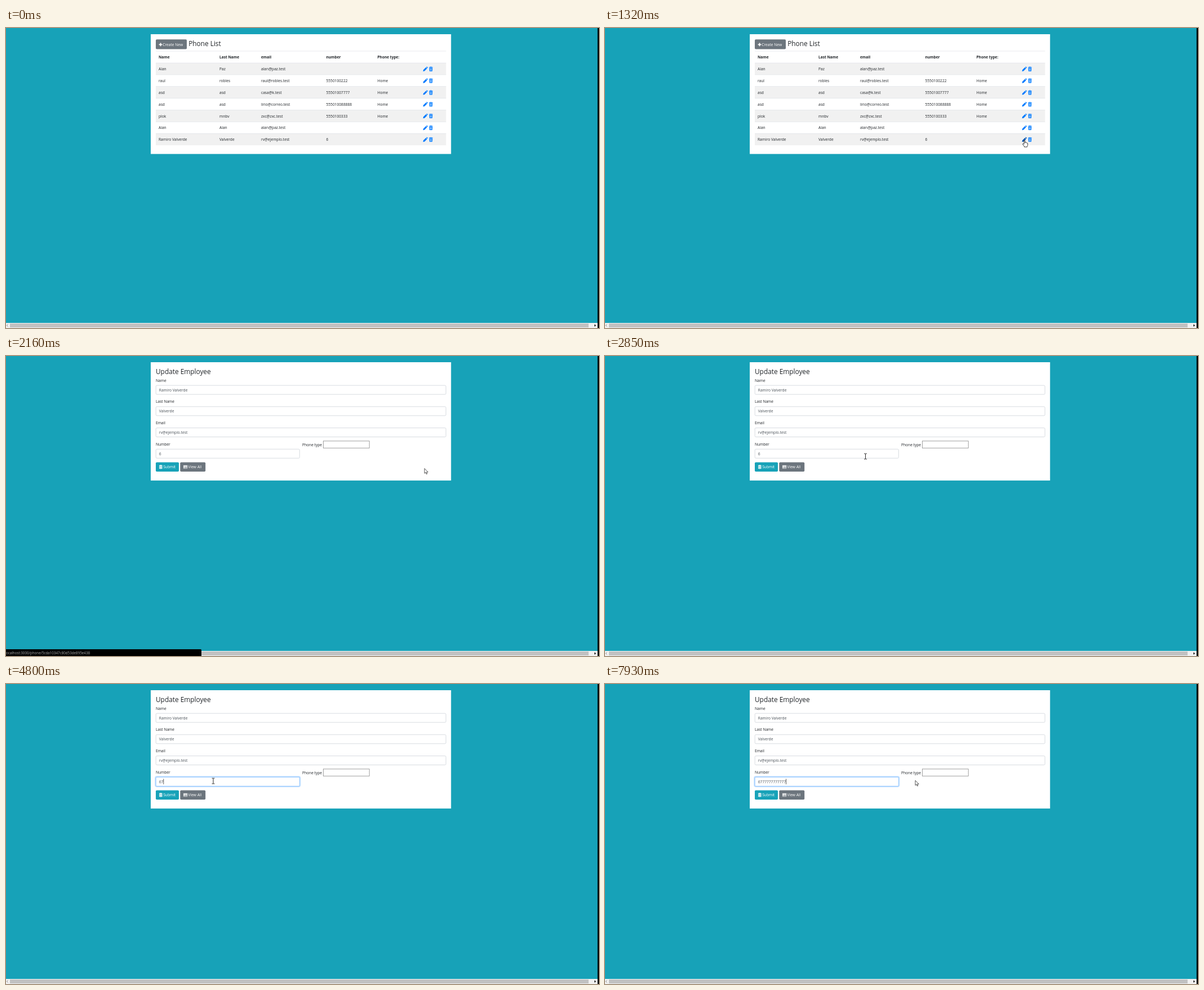
An HTML page that plays this animation: 1053 px wide and 532 px high, repeating every 8000 ms.

```html
<!DOCTYPE html>
<html lang="en">
<head>
<meta charset="utf-8">
<title>Phone list</title>
<style>
html, body { margin: 0; width: 100%; height: 100%; overflow: hidden; background: #17a2b8; }
svg { display: block; width: 100vw; height: 100vh; }
text { font: 6.65px "Open Sans", "Noto Sans", sans-serif; fill: #212529; white-space: pre; }
.title { font-size: 11.85px; font-weight: 500; }
.head { font-size: 6.55px; font-weight: 700; }
.value { fill: #495057; }
.button { fill: #fff; }
.url { font-size: 6.25px; fill: #aaa; }
</style>
</head>
<body>
<svg id="stage" viewBox="0 0 1053 532">
  <rect width="1053" height="532" fill="#17a2b8"/>
  <g id="list"></g>
  <g id="form"></g>
  <rect y="523" width="1051" height="9" fill="#f1f1f1"/>
  <rect id="thumb" x="7" y="524" width="1027.5" height="7"/>
  <path d="M3.4 525.4 1.4 527.4 3.4 529.4" fill="none" stroke="#777" stroke-width=".9"/>
  <path d="M1045 525.2v4.6l2.5-2.3z"/>
  <rect x="1050.5" width="2.5" height="532"/>
  <g id="status">
    <path d="M0 520H345.5q1.5 0 1.5 1.5V532H0z"/>
    <text class="url" x="0" y="528.6">ocalhost:3000/phone/5cda10347c80d53de895e438</text>
  </g>
  <g id="cursor">
    <path id="arrow" d="M0 0V8.7L2 6.9 3.4 10 4.8 9.4 3.5 6.4H6.2z" fill="#fff" stroke="#111" stroke-width=".7"/>
    <path id="hand" d="M-.9 .7q.9-1.2 1.8 0V4.5l.2-.8q1-.5 1.4 .3l.2.3q1-.4 1.4 .4l.1.4q1.1-.3 1.4 .6V8.7q-.2 1.4-1 2V12H-.4V11L-3 7.7q-.8-1.3 .2-1.7 .8-.2 1.9 1.2z" fill="#fff" stroke="#111" stroke-width=".8"/>
    <path id="beam" d="M-2.4-4.9H-.6L0-4.5 .6-4.9H2.4M-2.4 4.9H-.6L0 4.5 .6 4.9H2.4M0-4.5V4.5" fill="none" stroke="#111" stroke-width=".9"/>
  </g>
</svg>
<script>
const LOOP = 8000;
const $ = id => document.getElementById(id);

function add(parent, tag, attrs, text = "") {
  const el = document.createElementNS("http://www.w3.org/2000/svg", tag);
  for (const key in attrs) el.setAttribute(key, attrs[key]);
  el.textContent = text;
  return parent.appendChild(el);
}
const rect = (g, x, y, width, height, fill, more) => add(g, "rect", { x, y, width, height, fill, ...more });
const label = (g, x, y, text, cls = "") => add(g, "text", { x, y, class: cls }, text);
const icon = (g, x, y, d, fill) => add(g, "path", { d, fill, transform: `translate(${x} ${y})` });

// Phone list
const list = $("list"), cols = [271, 379, 453, 568.5, 659.5], pitch = 20.85;
const rows = [
  ["Alan", "Paz", "alan@paz.test"],
  ["raul", "robles", "raul@robles.test", "5550100222", "Home"],
  ["asd", "asd", "casa@k.test", "55501007777", "Home"],
  ["asd", "asd", "lirio@correo.test", "555010088888", "Home"],
  ["plok", "mnbv", "zxc@zxc.test", "5550100333", "Home"],
  ["Alan", "Alan", "alan@paz.test"],
  ["Ramiro Valverde", "Valverde", "rv@ejemplo.test", "6"]
];
const PENCIL = "M-3.8 3.9 -3.3 1.2 1.3-3.3 3.4-1.2-1.1 3.3zM1.9-3.8l.5-.5q.5-.4 1 0l1 1q.4.5 0 1l-.5.5z";
const TRASH = "M-3.3-3.5h2l.6-.6h1.4l.6.6h2v.9h-6.6zM-2.9-2.1h5.8l-.4 6.1h-5zM-1.5-1v4h.5v-4zM-.25-1v4h.5v-4zM1-1v4h.5v-4z";
let pencil, trash;

rect(list, 257, 11, 533.3, 212.4, "#fff");
rect(list, 266, 20.3, 55, 17.2, "#6c757d", { rx: 1.8 });
icon(list, 274.5, 29.4, "M-.9-2.9H.9V-.9H2.9V.9H.9V2.9H-.9V.9H-2.9V-.9H-.9z", "#fff");
label(list, 278.3, 32, "Create New", "button");
label(list, 324.2, 32, "Phone List", "title");
rect(list, 266, 40.6, 515.5, .7, "#dee2e6");
["Name", "Last Name", "email", "number", "Phone type:"].forEach((h, i) => label(list, cols[i], 54, h, "head"));
rows.forEach((row, i) => {
  const y = 62 + i * pitch;
  if (i % 2 == 0) rect(list, 266, y, 515.5, pitch, "#f1f1f1");
  rect(list, 266, y - .3, 515.5, .7, "#dee2e6");
  row.forEach((cell, k) => label(list, cols[k], y + 13.2, cell));
  pencil = icon(list, 744.4, y + 11, PENCIL, "#007bff");
  trash = icon(list, 754.5, y + 10.7, TRASH, "#007bff");
  trash.setAttribute("fill-rule", "evenodd");
});

// Update form
const form = $("form");
const border = { stroke: "#ced4da", "stroke-width": .8, rx: 1.8 };
rect(form, 257, 11, 533.3, 209.8, "#fff");
label(form, 266, 32, "Update Employee", "title");
const glow = rect(form, 265.2, 164.1, 257.1, 17.9, "none", { stroke: "#bfdeff", "stroke-width": 1.8, rx: 2.4 });
let box, number;
[["Name", "Ramiro Valverde"], ["Last Name", "Valverde"], ["Email", "rv@ejemplo.test"], ["Number", "6"]].forEach(([name, value], i) => {
  const y = 52 + i * 37.7;
  label(form, 266, y - 6.4, name);
  box = rect(form, 266.2, y + .1, i < 3 ? 515 : 255.2, 16, "#fff", border);
  number = label(form, 271.8, y + 10.5, value, "value");
});
const caret = rect(form, 0, 168.2, .8, 9.6, "#333");
label(form, 526, 160.2, "Phone type");
rect(form, 563.4, 150.8, 81.8, 12.4, "#fff", { stroke: "#888", "stroke-width": .8 });
rect(form, 266, 188.4, 41, 16.6, "#17a2b8", { rx: 1.8 });
icon(form, 274.8, 196.7, "M-2.9-2.8Q0-4.2 2.9-2.8V-1.7Q0-.5-2.9-1.7zM-2.9-1Q0 .2 2.9-1V.6Q0 1.8-2.9 .6zM-2.9 1.3Q0 2.5 2.9 1.3V2.8Q0 4.2-2.9 2.8z", "#fff");
label(form, 279.2, 199.3, "Submit", "button");
rect(form, 309.3, 188.4, 44.9, 16.6, "#6c757d", { rx: 1.8 });
icon(form, 318.6, 196.7, "M-3.5-2.8h7v5.6h-7z", "#fff");
icon(form, 318.6, 196.7, "M-2.8-1.3h1v.7h-1zM-1.2-1.3h4v.7h-4zM-2.8 0h1v.7h-1zM-1.2 0h4v.7h-4zM-2.8 1.3h1v.7h-1zM-1.2 1.3h4v.7h-4z", "#6c757d");
label(form, 323.6, 199.3, "View All", "button");

// Pointer path: time, x, y
const path = [
  [304, 700, 527], [420, 704, 515], [640, 724, 350], [860, 746, 235], [1010, 754, 193], [1120, 754, 195],
  [1290, 745, 199], [1680, 745, 199], [1690, 745.6, 199.6], [2120, 745.6, 199.6], [2400, 660, 195],
  [2620, 540, 186], [2800, 462.5, 178], [2850, 462.5, 178], [2960, 430, 173], [3180, 368, 172],
  [7220, 368, 172], [7290, 367, 166], [7360, 366, 155], [7520, 366, 155], [7600, 364.5, 147],
  [7680, 364.5, 147], [7750, 385, 136], [7820, 470, 150], [7890, 551, 171], [8000, 551, 171]
];
function pointer(t) {
  const i = path.findIndex(p => p[0] > t), [t0, x0, y0] = path[i - 1], [t1, x1, y1] = path[i];
  const k = (t - t0) / (t1 - t0);
  return [x0 + (x1 - x0) * k, y0 + (y1 - y0) * k];
}

const strokes = [4800, 4960, 5110, 5260, 5490, 5660, 5810, 5960, 6130, 6280, 6450, 6600];
const OPEN = 1930, FOCUS = 3250, BLINK = 535;
const show = (el, on) => el.setAttribute("display", on ? "inline" : "none");
const clamp = v => Math.max(0, Math.min(1, v));
const inside = (x, y, l, t, r, b) => x > l && x < r && y > t && y < b;

function draw(t) {
  const opened = t >= OPEN, focused = t >= FOCUS;
  show(list, !opened);
  show(form, opened);

  // Typing and caret
  const typed = strokes.filter(s => s <= t);
  const value = "6" + "7".repeat(typed.length);
  if (number.textContent != value) number.textContent = value;
  show(glow, focused);
  box.setAttribute("stroke", focused ? "#80bdff" : "#ced4da");
  const since = t - (typed.length ? typed[typed.length - 1] : FOCUS);
  show(caret, focused && Math.floor(since / BLINK) % 2 == 0);
  if (opened) caret.setAttribute("x", 271.8 + number.getComputedTextLength());

  const q = Math.floor(t / 76) * 76, moving = q >= 304;
  show($("cursor"), moving);
  const [x, y] = moving ? pointer(q) : [0, 0];
  const onPencil = !opened && inside(x, y, 740, 193, 749.5, 203);
  const onTrash = !opened && inside(x, y, 749.5, 193, 759, 203);
  const onField = opened && (inside(x, y, 266, 165, 521.5, 181.5) || inside(x, y, 266, 127.3, 781.5, 144));
  const hand = onPencil || onTrash || (opened && t < 2160);
  $("cursor").setAttribute("transform", `translate(${x} ${y})`);
  show($("hand"), hand);
  show($("beam"), !hand && onField);
  show($("arrow"), !hand && !onField);
  pencil.setAttribute("fill", onPencil ? "#0056b3" : "#007bff");
  trash.setAttribute("fill", onTrash ? "#0056b3" : "#007bff");
  $("thumb").setAttribute("fill", moving && y > 523 ? "#a8a8a8" : "#c1c1c1");
  $("status").setAttribute("opacity", Math.min(clamp((t - 1380) / 300), clamp((2420 - t) / 240)));
}

function tick() {
  draw(performance.now() % LOOP);
  requestAnimationFrame(tick);
}
tick();
</script>
</body>
</html>
```
